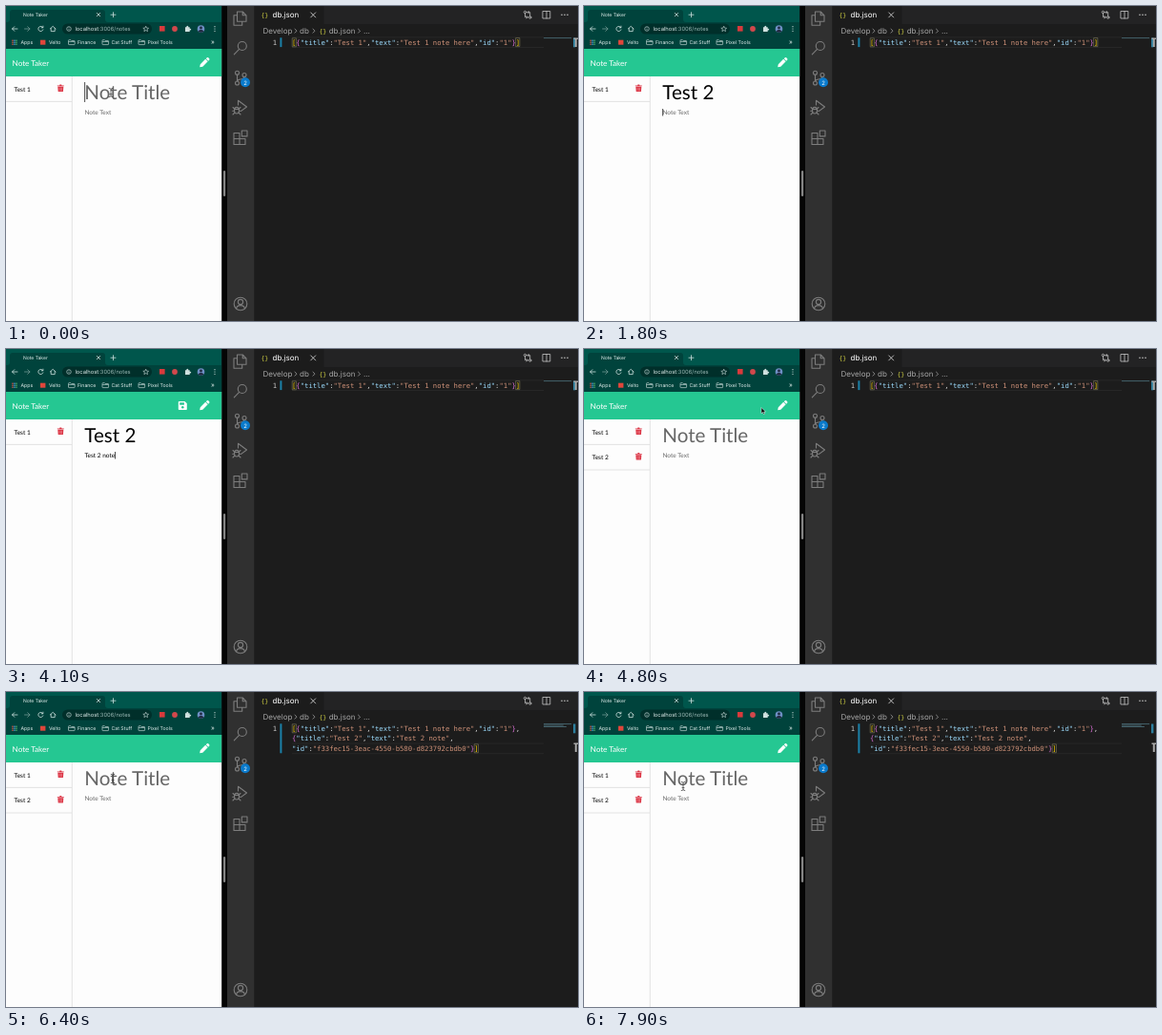
These frames come from a looping animation (600x331 px, 8000 ms). An HTML page:

```html
<!DOCTYPE html>
<html lang="en">
<head>
<meta charset="utf-8">
<title>Note Taker</title>
<style>
  html, body { margin: 0; width: 100%; height: 100%; overflow: hidden; background: #1c1c1c; }
  svg { display: block; width: 100%; height: 100%; }
  text { white-space: pre; text-rendering: geometricPrecision; }
  .page { font-family: Lato, sans-serif; font-size: 6.5px; fill: #000; }
  .page .title { font-size: 20.6px; }
  .page .empty { fill: #666; }
  .ui { font-family: Inter, Roboto, sans-serif; fill: #e4efed; }
  .bar { font-size: 5.2px; }
  .code { font-family: "DejaVu Sans Mono", monospace; font-size: 7.22px; fill: #d4d4d4; }
  .key { fill: #9cdcfe; }
  .str { fill: #ce9178; }
  .sq { fill: #ffd700; }
  .curly { fill: #da70d6; }
  .line { fill: none; stroke-linecap: round; stroke-linejoin: round; }
  .tools { stroke: #7d7d7d; stroke-width: 1.1; }
  .match { fill: none; stroke: #85805e; stroke-width: .6; }
</style>
</head>
<body>
<svg viewBox="0 0 600 331" preserveAspectRatio="none">
  <defs>
    <g id="trash">
      <path d="M0 .9H2.2L2.7 0H4.3L4.8 .9H7V1.8H0ZM.5 2.3H6.5L6.1 7.6H.9Z" fill="#dc3545"/>
      <path d="M2.3 3.3V6.7M3.5 3.3V6.7M4.7 3.3V6.7" stroke="#f3aab1" stroke-width=".4"/>
    </g>
    <path id="folder" d="M0 1Q0 .4 .6 .4H2.4L3.2 1.2H6Q6.6 1.2 6.6 1.8V4.8Q6.6 5.3 6 5.3H.6Q0 5.3 0 4.8ZM.1 2.2H6.5"
      fill="none" stroke="#b9cfcc" stroke-width=".7"/>
  </defs>

  <!-- browser -->
  <rect width="226.4" height="46" fill="#00564c"/>
  <path d="M1 17Q4 17 4 14V7Q4 4 7 4H101Q104 4 104 7V14Q104 17 107 17H226.4V46H0V17Z" fill="#00433c"/>
  <g class="ui bar">
    <text x="18" y="11" font-size="5">Note Taker</text>
    <g class="line" stroke="#cfe0de" stroke-width=".8">
      <path d="M95.3 7.4L98.7 10.8M98.7 7.4L95.3 10.8M110 9.2H115M112.5 6.7V11.7"/>
      <path d="M12 24H6.5M8.8 21.7L6.5 24L8.8 26.3"/>
      <path d="M19.5 24H25M22.7 21.7L25 24L22.7 26.3" stroke="#6f9792"/>
      <path d="M38.7 22.6A2.6 2.6 0 1 0 38.9 24.9M38.9 21.1V22.8H37.1"/>
      <path d="M46.3 24L49.2 21.3L52.1 24M47.2 23.5V26.6H51.2V23.5"/>
    </g>
    <rect x="59" y="18.5" width="94" height="11" rx="5.5" fill="#002f2a"/>
    <circle cx="66" cy="24" r="2.3" fill="none" stroke="#cfe0de" stroke-width=".6"/>
    <path d="M66 23.7V25.3M66 22.5V23" stroke="#cfe0de" stroke-width=".6"/>
    <text x="72.4" y="26" font-size="5.8">localhost<tspan fill="#9dbab6">:3006/notes</tspan></text>
    <path d="M146.7 21.2L147.5 23.1L149.6 23.3L148 24.6L148.5 26.6L146.7 25.5L144.9 26.6L145.4 24.6L143.8 23.3L145.9 23.1Z"
      fill="none" stroke="#cfe0de" stroke-width=".6"/>
    <rect x="161" y="21" width="5.6" height="5.6" fill="#d93a3c"/>
    <circle cx="177" cy="24" r="2.9" fill="#d2484c"/>
    <path d="M188 22.3H189.3Q189 20.7 190.3 20.7Q191.6 20.7 191.3 22.3H192.7V23.7Q194.2 23.4 194.2 24.6Q194.2 25.7 192.7 25.4V27H188Z" fill="#cfe0de"/>
    <circle cx="204.5" cy="24" r="3.8" fill="#6e8fc4"/>
    <path d="M201.5 26.4Q204.5 23.8 207.5 26.4Q204.5 29.2 201.5 26.4Z" fill="#20283f"/>
    <circle cx="204.5" cy="23" r="1.4" fill="#20283f"/>
    <g fill="#d9e6e4"><circle cx="219" cy="21.7" r=".6"/><circle cx="219" cy="24" r=".6"/><circle cx="219" cy="26.3" r=".6"/></g>
    <g id="apps"></g>
    <text x="15.5" y="40">Apps</text>
    <rect x="36" y="35.7" width="5.4" height="5" fill="#e0463b"/>
    <text x="45" y="40">Velto</text>
    <use href="#folder" x="65.5" y="35.3"/><text x="75" y="40">Finance</text>
    <use href="#folder" x="101" y="35.3"/><text x="110.5" y="40">Cat Stuff</text>
    <use href="#folder" x="139" y="35.3"/><text x="148.5" y="40">Pixel Tools</text>
    <text x="215" y="40.3" font-size="6.5">»</text>
  </g>

  <!-- page -->
  <rect y="45" width="226.4" height="286" fill="#fdfdfd"/>
  <rect y="45" width="226.4" height="29" fill="#25c792"/>
  <path d="M69.3 74V331M0 100.4H69" stroke="#dcdcdc" stroke-width=".8"/>
  <g class="page">
    <text x="6.6" y="62.6" font-size="8.1" fill="#fff">Note Taker</text>
    <text x="8.6" y="89.5">Test 1</text>
    <use href="#trash" x="53.8" y="82.5"/>
    <g id="row">
      <text x="8.6" y="116">Test 2</text>
      <use href="#trash" x="53.8" y="109"/>
      <path d="M0 127H69" stroke="#dcdcdc" stroke-width=".8"/>
    </g>
    <text id="title" class="title" x="82.3" y="98"></text>
    <text id="body" x="82.5" y="114"></text>
  </g>
  <path d="M203.2 64.3L203.8 61.2L209.2 55.8L211.7 58.3L206.3 63.7ZM209.8 55.2L210.8 54.2Q211.5 53.7 212.2 54.3L213.2 55.3Q213.8 56 213.2 56.7L212.2 57.7Z" fill="#fff"/>
  <g id="save">
    <path d="M181.6 55H187.5L189.8 57.3V63.2Q189.8 64 189 64H181.6Q180.8 64 180.8 63.2V55.8Q180.8 55 181.6 55Z" fill="#fff"/>
    <path d="M182.2 56.3H186.9V58.7H182.2Z" fill="#25c792"/>
    <circle cx="185.3" cy="61.3" r="1.3" fill="#25c792"/>
  </g>
  <rect id="caret" width=".8" fill="#222"/>

  <!-- divider -->
  <rect x="226.4" width="5.6" height="331" fill="#050505"/>
  <rect x="228" y="173" width="2.2" height="27" rx="1.1" fill="#858585"/>

  <!-- editor -->
  <rect x="232" width="28.5" height="331" fill="#303030"/>
  <rect x="260.5" width="339.5" height="331" fill="#1c1c1c"/>
  <rect x="333.5" width="266.5" height="19" fill="#232324"/>
  <g class="line tools">
    <path d="M242.5 6H248.2L252 9.8V16.2H242.5ZM248.2 6V9.8H252M242.5 9.8H239V20.3H247.7V16.2"/>
    <circle cx="247.8" cy="42" r="4.5"/><path d="M244.6 45.3L239.3 50.8"/>
    <circle cx="242.5" cy="70.3" r="2"/><circle cx="250" cy="72.5" r="2"/><circle cx="242.5" cy="81" r="2"/>
    <path d="M242.5 72.3V79M250 74.5Q249.5 77 246 77Q243.4 77 242.5 79"/>
    <path d="M243.5 104V99.2L252.5 106L246.6 110.4"/>
    <ellipse cx="242" cy="109.7" rx="2.5" ry="3.3"/><path d="M239.6 108.5H244.4M238 106.5L239.7 108M246 106.5L244.3 108M237.7 110.3H239.5M244.5 110.3H246.3M238 114L239.8 112.2M246 114L244.2 112.2"/>
    <path d="M239 133.5H245V139.5H251V145.5H239ZM239 139.5H245V145.5M247.3 131H253V136.9H247.3Z"/>
    <circle cx="246" cy="313" r="6.8"/><circle cx="246" cy="311" r="2.6"/><path d="M241.5 318Q242 314.6 246 314.6Q250 314.6 250.5 318"/>
  </g>
  <circle cx="251" cy="80.3" r="5" fill="#0a7acc"/>
  <g class="ui">
    <text x="251" y="82.5" font-size="6" text-anchor="middle" fill="#fff">2</text>
    <text x="279.5" y="12" font-size="8" fill="#fff">db.json</text>
    <g font-size="8" fill="#a3a3a3">
      <text x="269.5" y="29">Develop</text><text x="308" y="29">db</text>
      <text x="338.7" y="29">db.json</text><text x="375" y="29">...</text>
    </g>
  </g>
  <g class="code">
    <text x="267.5" y="11.6" fill="#cbcb41" font-size="6.6" letter-spacing="-.2">{}</text>
    <text x="328.5" y="28.6" fill="#cbcb41" font-size="6.6" letter-spacing="-.2">{}</text>
    <text x="279.8" y="41" fill="#c6c6c6">1</text>
  </g>
  <g class="line" stroke="#a3a3a3" stroke-width=".8">
    <path d="M303 24.2L305 26.2L303 28.2M322 24.2L324 26.2L322 28.2M369.5 24.2L371.5 26.2L369.5 28.2"/>
    <path d="M319.7 6.9L324.7 11.9M324.7 6.9L319.7 11.9" stroke="#e0e0e0"/>
    <g stroke="#c5c5c5">
      <circle cx="544.5" cy="6.5" r="1.2"/><circle cx="549.7" cy="12" r="1.2"/>
      <path d="M544.5 7.7V11.8H547M546 10.6L547.2 11.8L546 13M549.7 10.8V6.6H547.3M548.3 5.4L547.1 6.6L548.3 7.8"/>
      <path d="M563.3 5.5H570.8V13H563.3ZM567 5.5V13"/>
    </g>
  </g>
  <g fill="#c5c5c5"><circle cx="583" cy="9.3" r=".8"/><circle cx="586" cy="9.3" r=".8"/><circle cx="589" cy="9.3" r=".8"/></g>

  <path id="current" d="M0 -7.9H264M0 2.7H264" stroke="#2a2a2a" stroke-width=".8"/>
  <g id="code" class="code"></g>
  <rect id="changed" x="287.4" y="33.3" width="2" fill="#1b81a8"/>
  <path class="match" d="M300.2 33.8H304.4V42.8H300.2Z"/>
  <path id="closing" class="match" d="M0 -7.2H4.2V1.8H0Z"/>
  <g id="map" fill="#5d8d9c"></g>
  <rect x="595" y="33.5" width="2.4" height="9.8" fill="#2d7f9e"/>
  <path id="ruler" d="M595.5 0H600V1.4H598.8V9.5H596.8V1.4H595.5Z" fill="#a7a7a7"/>

  <!-- pointers -->
  <path id="arrow" d="M0 0V6.2L1.5 4.9L2.5 7.1L3.6 6.6L2.6 4.5H4.5Z" fill="#000" stroke="#fff" stroke-width=".5"/>
  <path id="beam" class="line" d="M-1.8 -4.6Q0 -4.6 0 -3.6V3.6Q0 4.6 -1.8 4.6M1.8 -4.6Q0 -4.6 0 -3.6M0 3.6Q0 4.6 1.8 4.6M-1 1.6H1" stroke="#333" stroke-width=".7"/>
</svg>
<script>
const LOOP = 8000, CHAR = 4.345, CODE_X = 300, CODE_Y = 40.8, LINE = 10.6;
const SAVED = 4500, WRITTEN = 5800, BODY_FOCUS = 1700;
const $ = id => document.getElementById(id);

const titleKeys = [300, 400, 600, 700, 900, 1200];
const bodyKeys = [2300, 2400, 2600, 2700, 3000, 3200, 3400, 3600, 3800, 3900, 4000];
const first = '[{"title":"Test 1","text":"Test 1 note here","id":"1"}';
const before = [first + ']'];
const after = [first + ',', '{"title":"Test 2","text":"Test 2 note",',
  '"id":"f33fec15-3eac-4550-b580-d823792cbdb0"}]'];

// time, x, y of the pointer
const path = [[0, 110, 91], [4100, 150, 95], [4400, 186, 61.5], [5600, 186, 61.5],
  [6200, 112, 91], [6600, 112, 91], [7000, 108, 104], [7500, 106, 103], [7900, 104, 99], [8000, 104, 99]];

const colours = ['#e5554d', '#58a6e8', '#58b86c'];
$('apps').innerHTML = Array.from({ length: 9 }, (_, i) =>
  `<rect x="${6.3 + i % 3 * 2}" y="${35.6 + (i / 3 | 0) * 2}" width="1.3" height="1.3" fill="${colours[i % 3]}"/>`).join('');

function paint(line) {
  return line.replace(/"[^"]*"(?=(:?))|[[\]]|[{}]/g, (s, colon) => {
    const kind = s[0] === '"' ? (colon ? 'key' : 'str') : /[[\]]/.test(s) ? 'sq' : 'curly';
    return `<tspan class="${kind}">${s}</tspan>`;
  });
}

let shown;
function setCode(lines) {
  if (lines === shown) return;
  shown = lines;
  const last = lines.length - 1, y = CODE_Y + last * LINE;
  $('code').innerHTML = lines.map((s, i) =>
    `<text x="${CODE_X}" y="${CODE_Y + i * LINE}">${paint(s)}</text>`).join('');
  $('map').innerHTML = lines.map((s, i) =>
    `<rect x="564" y="${33.2 + i * 1.4}" width="${s.length * .53}" height=".9" opacity=".7"/>`).join('');
  $('changed').setAttribute('height', 9.8 + last * LINE);
  move('closing', CODE_X + (lines[last].length - 1) * CHAR, y);
  move('current', CODE_X, y);
  move('ruler', 0, 33.5 + (last ? 20 : 0));
}

const show = (id, on) => $(id).setAttribute('visibility', on ? 'visible' : 'hidden');
const move = (id, x, y) => $(id).setAttribute('transform', `translate(${x} ${y})`);
const typed = (full, keys, t) => full.slice(0, keys.filter(k => k <= t).length);

function field(id, value, hint) {
  $(id).textContent = value || hint;
  $(id).classList.toggle('empty', !value);
}

function pointer(t) {
  const i = path.findIndex((p, n) => n && t <= p[0]);
  const [a, b] = [path[i - 1], path[i]];
  const k = (t - a[0]) / (b[0] - a[0]);
  return [a[1] + (b[1] - a[1]) * k, a[2] + (b[2] - a[2]) * k];
}

function draw(t) {
  const open = t < SAVED;
  const title = open ? typed('Test 2', titleKeys, t) : '';
  const body = open ? typed('Test 2 note', bodyKeys, t) : '';
  field('title', title, 'Note Title');
  field('body', body, 'Note Text');
  show('save', title && body);
  show('row', !open);
  setCode(t < WRITTEN ? before : after);

  const inBody = t >= BODY_FOCUS, id = inBody ? 'body' : 'title';
  const value = inBody ? body : title;
  const x = 82.3 + (value ? $(id).getComputedTextLength() : 0);
  $('caret').setAttribute('x', x);
  $('caret').setAttribute('y', inBody ? 108 : 80);
  $('caret').setAttribute('height', inBody ? 7.5 : 21);
  show('caret', open);

  const [px, py] = pointer(t);
  const visible = t < titleKeys[0] || t > 4100;
  const overText = px > 80 && py > 76;
  move('arrow', px, py);
  move('beam', px, py);
  show('arrow', visible && !overText);
  show('beam', visible && overText);
}

function tick(now) {
  draw(Math.floor(now % LOOP / 100) * 100);
  requestAnimationFrame(tick);
}
draw(0);
requestAnimationFrame(tick);
</script>
</body>
</html>
```
